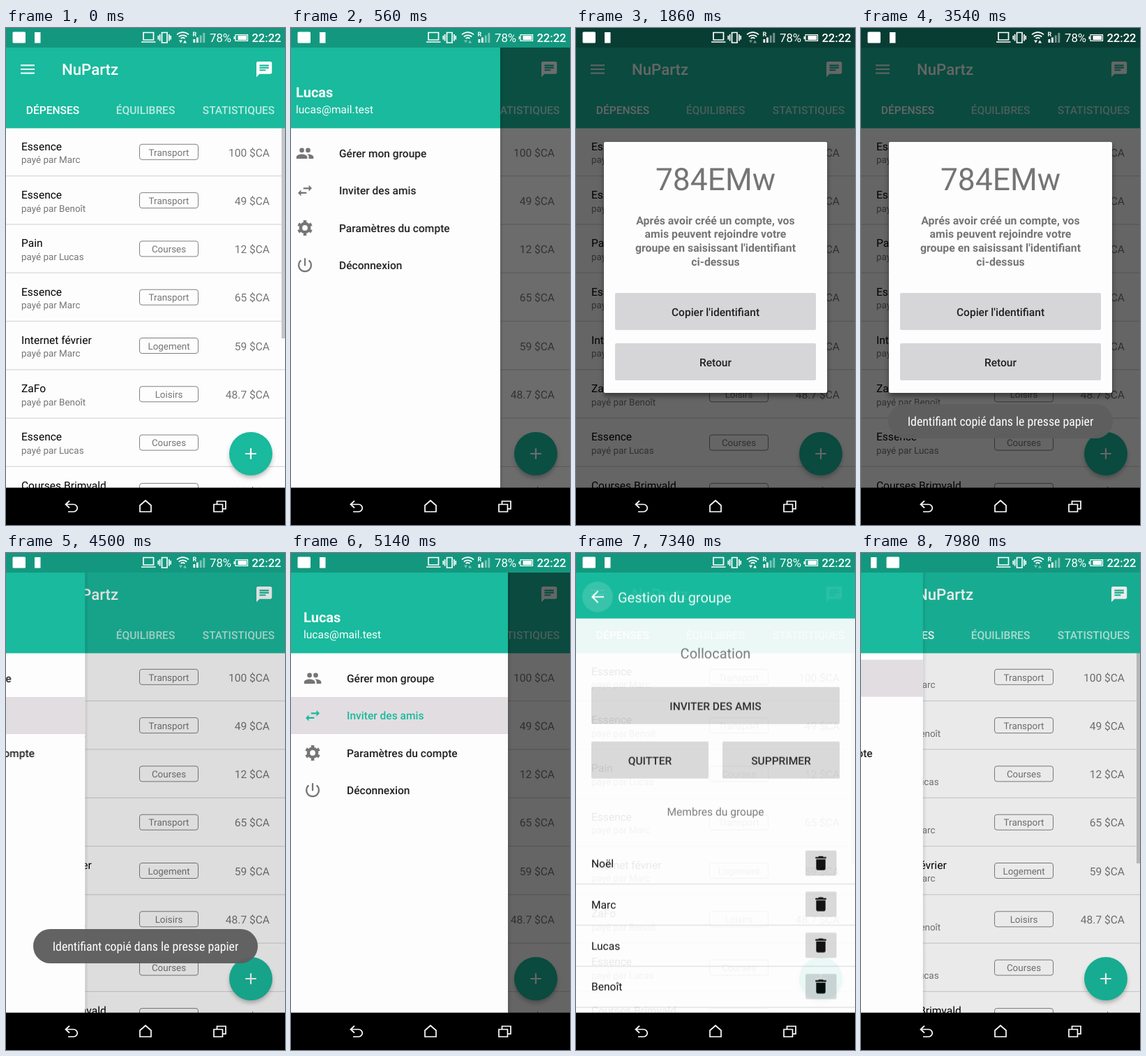
Write an HTML page that moves like this. It is 400 by 711 pixels and loops after 8 s.

```html
<!DOCTYPE html>
<html lang="fr">
<head>
<meta charset="utf-8">
<title>Partage de dépenses</title>
<style>
html, body { margin: 0; width: 100%; height: 100%; overflow: hidden; background: #000; }
svg { display: block; width: 100%; height: 100%; font-family: Roboto, "Open Sans", sans-serif; font-size: 15.56px; text-rendering: geometricPrecision; }
.mid { text-anchor: middle; }
.end { text-anchor: end; }
.med { font-weight: 500; }
.bold { font-weight: 700; }
.small { font-size: 13.4px; }
.big { font-size: 20px; }
.grey { fill: #757575; }
.white { fill: #fff; }
.dark { fill: #212121; }
.teal { fill: #19ba9d; }
.btn { fill: #d6d6d8; }
.paper { fill: #fdfdfd; }
.line { fill: none; stroke: #fff; stroke-width: 2.2; }
.thin { stroke-width: 1.7; }
.hair { stroke-width: 1.2; }

.anim { animation: 8s linear infinite; }
#drawer { animation-name: drawer; }
#scrim { animation-name: scrim; }
#dim { animation-name: dim; }
#dialog { animation-name: dialog; transform-origin: 200px 343px; }
#toast { animation-name: toast; }
#group { animation-name: group; }
#bar { animation-name: bar; }
#arrows { animation-name: arrows; }
#mail { animation-name: mail; }
#note { animation-name: note; }
#sel { animation-name: sel; }
#item0 { animation-name: item0; }
#item1 { animation-name: item1; }
.ripple { transform-box: fill-box; transform-origin: center; opacity: 0; }
#tapMenu { animation-name: tapMenu; }
#tapCopy { animation-name: tapCopy; }
#tapBack { animation-name: tapBack; }
#tapUp { animation-name: tapUp; }

@keyframes drawer {
  0%, 3.74% { transform: translateX(-330px); }
  3.75% { transform: translateX(-311px); animation-timing-function: cubic-bezier(.22, 1, .36, 1); }
  10.15%, 17.74% { transform: translateX(0); }
  17.75% { transform: translateX(-177px); animation-timing-function: cubic-bezier(.22, 1, .36, 1); }
  23.15% { transform: translateX(-311px); }
  23.16%, 55.68% { transform: translateX(-330px); }
  55.69% { transform: translateX(-311px); animation-timing-function: cubic-bezier(.22, 1, .36, 1); }
  62.09%, 68.74% { transform: translateX(0); }
  68.75% { transform: translateX(-177px); animation-timing-function: cubic-bezier(.22, 1, .36, 1); }
  74.15% { transform: translateX(-311px); }
  74.16%, 99.34% { transform: translateX(-330px); }
  99.35% { transform: translateX(-311px); }
  100% { transform: translateX(-171px); }
}
@keyframes scrim {
  0% { opacity: 0; }
  4% { opacity: 0; animation-timing-function: cubic-bezier(.22, 1, .36, 1); }
  10.4%, 18% { opacity: .6; }
  18.01% { opacity: .26; animation-timing-function: cubic-bezier(.22, 1, .36, 1); }
  23.15% { opacity: 0; }
  55.95% { opacity: 0; animation-timing-function: cubic-bezier(.22, 1, .36, 1); }
  62.35%, 69% { opacity: .6; }
  69.01% { opacity: .26; animation-timing-function: cubic-bezier(.22, 1, .36, 1); }
  74.15%, 99.58% { opacity: 0; }
  100% { opacity: .173; }
}
@keyframes dim {
  0%, 18.25% { opacity: 0; }
  21%, 50% { opacity: .6; }
  52.75%, 100% { opacity: 0; }
}
@keyframes dialog {
  0% { opacity: 0; transform: scale(.9); }
  18.5% { opacity: 0; transform: scale(.9); animation-timing-function: cubic-bezier(.22, 1, .36, 1); }
  22%, 49.75% { opacity: 1; transform: scale(1); }
  52.25%, 100% { opacity: 0; transform: scale(.9); }
}
@keyframes toast {
  0%, 37.5% { opacity: 0; }
  43.5%, 58.5% { opacity: 1; }
  64%, 100% { opacity: 0; }
}
@keyframes group {
  0% { opacity: 0; transform: translateY(50px); }
  70.5% { opacity: 0; transform: translateY(50px); animation-timing-function: cubic-bezier(.22, 1, .36, 1); }
  75.5% { opacity: 1; transform: translateY(0); }
  91% { opacity: 1; transform: translateY(0); animation-timing-function: ease-in; }
  94.5%, 100% { opacity: 0; transform: translateY(50px); }
}
@keyframes bar {
  0%, .5% { opacity: 1; }
  3.6%, 90.9% { opacity: 0; }
  91%, 100% { opacity: 1; }
}
@keyframes arrows {
  0%, .49% { opacity: 1; }
  .5%, 37.99% { opacity: .45; }
  38%, 49.99% { opacity: 1; }
  50%, 71.99% { opacity: .45; }
  72%, 91.99% { opacity: 1; }
  92%, 100% { opacity: .45; }
}
@keyframes mail {
  0%, 91.99% { transform: translateX(0); }
  92%, 100% { transform: translateX(27px); }
}
@keyframes note {
  0%, 91.99% { transform: translateX(0); }
  92%, 100% { transform: translateX(-27px); }
}
@keyframes sel {
  0%, 17.74% { opacity: 0; transform: translateY(0); }
  17.75%, 68.74% { opacity: 1; transform: translateY(0); }
  68.75%, 100% { opacity: 1; transform: translateY(-53.3px); }
}
@keyframes item0 {
  0%, 68.74% { fill: #212121; color: #757575; }
  68.75%, 100% { fill: #19ba9d; color: #19ba9d; }
}
@keyframes item1 {
  0%, 17.74% { fill: #212121; color: #757575; }
  17.75%, 68.74% { fill: #19ba9d; color: #19ba9d; }
  68.75%, 100% { fill: #212121; color: #757575; }
}
@keyframes tapMenu {
  0%, .4% { opacity: 0; transform: scale(.2); }
  .5% { opacity: .2; transform: scale(.2); }
  4% { opacity: .2; transform: scale(1); }
  7%, 53.4% { opacity: 0; transform: scale(1); }
  53.41% { opacity: .2; transform: scale(.2); }
  55.7% { opacity: .2; transform: scale(1); }
  58%, 100% { opacity: 0; transform: scale(1); }
}
@keyframes tapCopy {
  0%, 35.7% { opacity: 0; transform: scale(.1); }
  35.75% { opacity: .12; transform: scale(.1); }
  39% { opacity: .12; transform: scale(1); }
  42%, 100% { opacity: 0; transform: scale(1); }
}
@keyframes tapBack {
  0%, 47.2% { opacity: 0; transform: scale(.1); }
  47.25% { opacity: .12; transform: scale(.1); }
  50% { opacity: .12; transform: scale(1); }
  52.5%, 100% { opacity: 0; transform: scale(1); }
}
@keyframes tapUp {
  0%, 88.2% { opacity: 0; transform: scale(.2); }
  88.25% { opacity: .2; transform: scale(.2); }
  91% { opacity: .2; transform: scale(1); }
  94%, 100% { opacity: 0; transform: scale(1); }
}
</style>
</head>
<body>
<svg viewBox="0 0 400 711" preserveAspectRatio="none">
  <defs>
    <filter id="soft" x="-30%" y="-30%" width="160%" height="160%"><feGaussianBlur stdDeviation="3.5"/></filter>
    <clipPath id="copyClip"><rect x="56" y="379" width="288" height="53" rx="2"/></clipPath>
    <clipPath id="backClip"><rect x="56" y="451" width="288" height="53" rx="2"/></clipPath>
    <linearGradient id="edge"><stop stop-opacity=".1"/><stop offset="1" stop-opacity="0"/></linearGradient>
  </defs>

  <!-- expense list -->
  <rect class="paper" width="400" height="711"/>
  <g id="rows"></g>
  <rect id="bar" class="anim" x="395" y="143" width="5" height="301" fill="#c6c6c6"/>
  <rect class="teal" y="28" width="400" height="115.4"/>
  <circle id="tapMenu" class="anim ripple white" cx="31" cy="59" r="22"/>
  <path class="line" stroke-opacity=".9" d="M21 53.4h20M21 59h20M21 64.6h20"/>
  <text class="white med" x="80" y="67" font-size="22.2">NuPartz</text>
  <path class="white" transform="translate(356.8 45.8) scale(1.111)" d="M20 2H4c-1.1 0-2 .9-2 2v18l4-4h14c1.1 0 2-.9 2-2V4c0-1.1-.9-2-2-2zM6 9h12v2H6V9zm8 5H6v-2h8v2zm4-6H6V6h12v2z"/>
  <g class="mid med white">
    <text x="67" y="122.5">DÉPENSES</text>
    <text x="200" y="122.5" opacity=".7">ÉQUILIBRES</text>
    <text x="333.5" y="122.5" opacity=".7">STATISTIQUES</text>
  </g>
  <circle cx="351" cy="613" r="30" opacity=".3" filter="url(#soft)"/>
  <circle class="teal" cx="351" cy="609" r="31"/>
  <path class="line" d="M343.2 609h15.6M351 601.2v15.6"/>

  <rect id="scrim" class="anim" y="28" width="400" height="630"/>

  <!-- drawer -->
  <g id="drawer" class="anim">
    <rect x="311" y="28" width="5" height="630" fill="url(#edge)"/>
    <rect class="paper" y="28" width="311" height="630"/>
    <rect class="teal" y="28" width="311" height="115.4"/>
    <text class="white bold big" x="18" y="99">Lucas</text>
    <text class="white" x="18" y="121.5">lucas@mail.test</text>
    <rect id="sel" class="anim" y="206" width="311" height="53" fill="#e2dde1"/>
    <g id="items" class="med"></g>
  </g>

  <!-- group page -->
  <g id="group" class="anim">
    <rect class="paper" y="28" width="400" height="630"/>
    <rect class="teal" y="28" width="400" height="62"/>
    <circle id="tapUp" class="anim ripple white" cx="31" cy="59" r="22"/>
    <path class="line" d="M40 59H23.5M31.6 50.8L23.4 59l8.2 8.2"/>
    <text class="white big" x="60" y="66.5">Gestion du groupe</text>
    <text class="grey mid big" x="200" y="147">Collocation</text>
    <g id="actions" class="mid med"></g>
    <text class="grey mid" x="200" y="372">Membres du groupe</text>
    <g id="members"></g>
  </g>

  <rect width="400" height="28" fill="#13987f"/>
  <rect id="dim" class="anim" width="400" height="658"/>

  <!-- invitation dialog -->
  <g id="dialog" class="anim">
    <rect x="40" y="168" width="320" height="359" opacity=".4" filter="url(#soft)"/>
    <rect class="paper" x="40" y="163" width="320" height="359" rx="2"/>
    <text class="grey mid" x="200" y="232" font-size="44.4">784EMw</text>
    <g id="advice" class="grey mid bold" font-size="15.8"></g>
    <rect class="btn" x="56" y="379" width="288" height="53" rx="2"/>
    <g clip-path="url(#copyClip)"><circle id="tapCopy" class="anim ripple" cx="200" cy="405" r="150"/></g>
    <text class="dark mid med" x="200" y="411.5">Copier l'identifiant</text>
    <rect class="btn" x="56" y="451" width="288" height="53" rx="2"/>
    <g clip-path="url(#backClip)"><circle id="tapBack" class="anim ripple" cx="200" cy="477" r="150"/></g>
    <text class="dark mid med" x="200" y="483.5">Retour</text>
  </g>

  <g id="toast" class="anim">
    <rect x="39" y="538" width="322" height="49" rx="24.5" fill="#5e5e5e" opacity=".97"/>
    <text class="white mid" x="200" y="569" font-size="17.8" style="font-family: 'Roboto Condensed', Roboto, sans-serif; font-stretch: 75%">Identifiant copié dans le presse papier</text>
  </g>

  <!-- status bar -->
  <g class="white">
    <rect id="mail" class="anim" x="9.5" y="5.5" width="18.5" height="16" rx="1.5"/>
    <rect id="note" class="anim" x="41" y="6" width="8.5" height="15.5"/>
    <path class="line thin" d="M197 6.5h14.5v10.5H197zM194 20h20.5"/>
    <path class="line thin" d="M223.5 6.5h7.5v14.5h-7.5zM220.6 9v9.5M233.9 9v9.5M218.3 11v5.5M236.2 11v5.5"/>
    <path class="line thin" d="M245 9.5a12.5 12.5 0 0 1 17 0M247.8 12.5a8.5 8.5 0 0 1 11.4 0M250.6 15a4.5 4.5 0 0 1 5.8 0"/>
    <path id="arrows" class="anim" d="M248 17.5h5l-2.5 4zM254 21.5h5l-2.5-4z"/>
    <text class="bold" x="267.5" y="11.5" font-size="9">R</text>
    <path d="M268.5 16h2.8v5h-2.8zM273 13.5h2.8v7.5H273z"/>
    <path opacity=".45" d="M277.8 10.5h2.8v10.5h-2.8zM282.4 7h2.8v14h-2.8z"/>
    <text x="292" y="20" font-size="16.8">78%</text>
    <path class="line hair" d="M329 9.6h17.5v8.8H329z"/>
    <path d="M326.5 12h2v4h-2zM332.5 11h12.6v6h-12.6z"/>
    <text class="med end" x="394.5" y="20" font-size="16.6">22:22</text>
  </g>

  <!-- navigation bar -->
  <rect y="657.6" width="400" height="54"/>
  <path class="line thin" d="M91 676.5l-5.5 5 5.5 5M86 681.5h11a5.2 5.2 0 0 1 0 10.5h-8M192 692v-9l8-7 8 7v9zM298 681.5h12.5v10.5H298zM302.5 681.5V677H315v10.8h-4.5"/>
</svg>
<script>
const fill = (id, list, draw) => {
  document.getElementById(id).innerHTML = list.map(draw).join('');
};

const expenses = [
  ['Essence', 'Marc', 'Transport', '100'],
  ['Essence', 'Benoît', 'Transport', '49'],
  ['Pain', 'Lucas', 'Courses', '12'],
  ['Essence', 'Marc', 'Transport', '65'],
  ['Internet février', 'Marc', 'Logement', '59'],
  ['ZaFo', 'Benoît', 'Loisirs', '48.7'],
  ['Essence', 'Lucas', 'Courses', '35'],
  ['Courses Brimvald', 'Marc', 'Courses', '109']
];
fill('rows', expenses, ([title, payer, tag, sum], i) => `
  <g transform="translate(0 ${i * 69.3})">
    <text x="22" y="174.7">${title}</text>
    <text class="grey small" x="22" y="193.3">payé par ${payer}</text>
    <rect x="191.5" y="166.3" width="84" height="22" rx="3.5" fill="none" stroke="#808080"/>
    <text class="grey small mid" x="233.5" y="182.5">${tag}</text>
    <text class="grey end" x="378" y="183.5">${sum} $CA</text>
    <rect y="211" width="400" height="1.2" fill="#d8d8d8"/>
  </g>`);

const icons = [
  '<path d="M16 11a3 3 0 1 0 0-6 3 3 0 0 0 0 6zM8 11a3 3 0 1 0 0-6 3 3 0 0 0 0 6zM8 13c-2.3 0-7 1.2-7 3.5V19h14v-2.5c0-2.3-4.7-3.5-7-3.5zM16 13l-1 .1c1.2.8 2 1.9 2 3.4V19h6v-2.5c0-2.3-4.7-3.5-7-3.5z"/>',
  '<path d="M7 11l-4 4 4 4v-3h7v-2H7zM21 9l-4-4v3h-7v2h7v3z"/>',
  `<g fill="none" stroke="currentColor"><circle cx="12" cy="12" r="5.5" stroke-width="4"/>
   <circle cx="12" cy="12" r="8.4" stroke-width="3" pathLength="60" stroke-dasharray="4.6 5.4" stroke-dashoffset="2.3" transform="rotate(-90 12 12)"/></g>`,
  '<path fill="none" stroke="currentColor" stroke-width="2" d="M12 3v10M17.1 5.9A8 8 0 1 1 6.9 5.9"/>'
];
const labels = ['Gérer mon groupe', 'Inviter des amis', 'Paramètres du compte', 'Déconnexion'];
fill('items', labels, (label, i) => `
  <g id="item${i}" class="anim" fill="#212121" color="#757575" transform="translate(0 ${i * 53.3})">
    <text x="80" y="185">${label}</text>
    <g fill="currentColor" transform="translate(17.7 166) scale(1.111)">${icons[i]}</g>
  </g>`);

const actions = [
  ['INVITER DES AMIS', 22, 188, 356],
  ['QUITTER', 22, 266, 168],
  ['SUPPRIMER', 210, 266, 168]
];
fill('actions', actions, ([label, x, y, w]) => `
  <rect class="btn" x="${x}" y="${y}" width="${w}" height="53" rx="2"/>
  <text class="dark" x="${x + w / 2}" y="${y + 32.5}">${label}</text>`);

fill('members', ['Noël', 'Marc', 'Lucas', 'Benoît'], (name, i) => `
  <g transform="translate(0 ${i * 58.8})">
    <text x="22" y="446">${name}</text>
    <rect class="btn" x="329" y="422" width="44.5" height="36" rx="2"/>
    <path transform="translate(337.7 426.7) scale(1.111)" d="M6 19c0 1.1.9 2 2 2h8c1.1 0 2-.9 2-2V7H6zM19 4h-3.5l-1-1h-5l-1 1H5v2h14z"/>
    <rect y="469.3" width="400" height="1.2" fill="#dcdcdc"/>
  </g>`);

const advice = ['Aprés avoir créé un compte, vos', 'amis peuvent rejoindre votre', "groupe en saisissant l'identifiant", 'ci-dessus'];
fill('advice', advice, (line, i) => `<text x="200" y="${280.7 + i * 19.7}">${line}</text>`);
</script>
</body>
</html>
```
